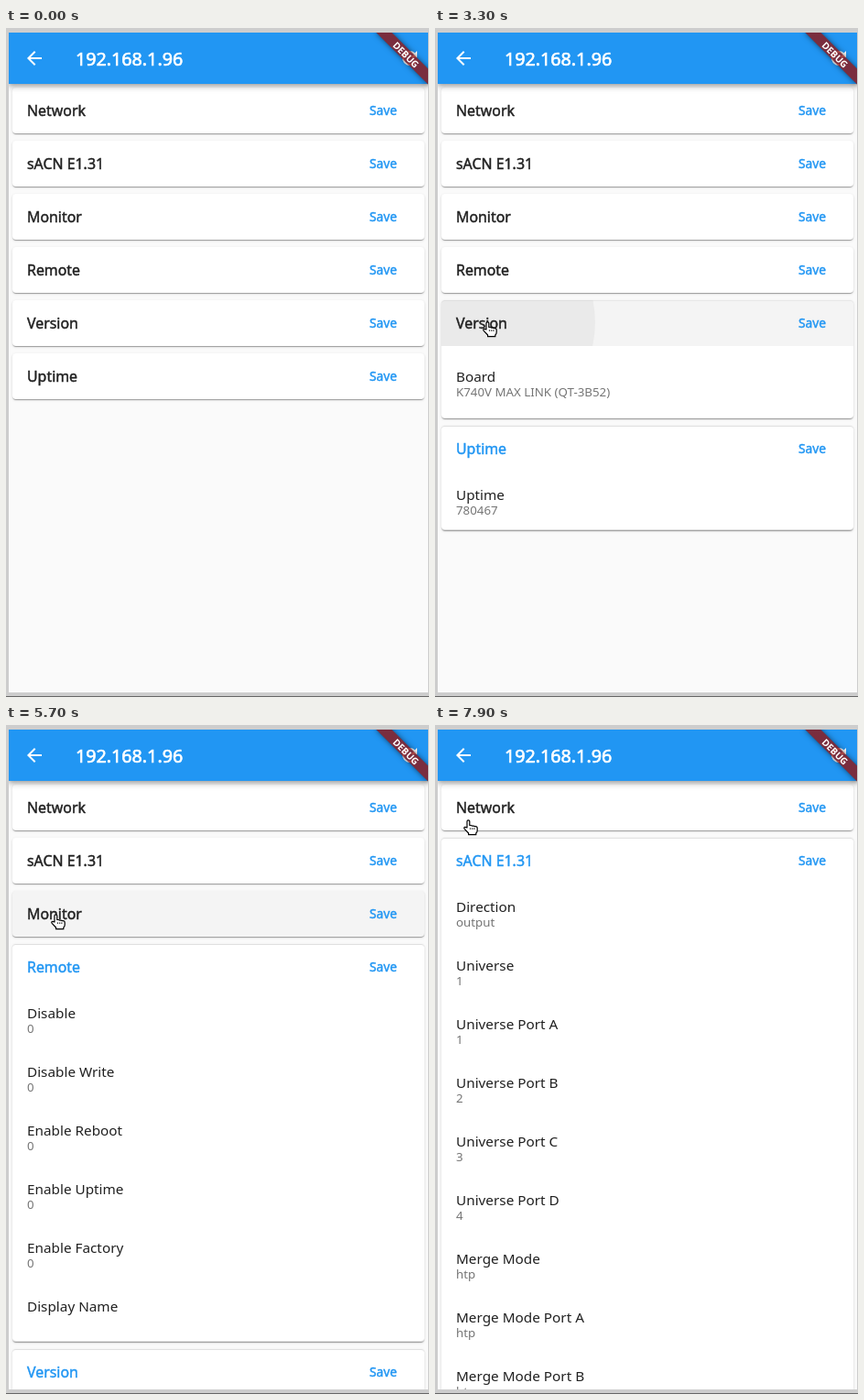
Recreate the animation shown at these times as an HTML page. Size 462 by 730 pixels, loop 8000 ms.

```html
<!DOCTYPE html>
<html lang="en">
<head>
<meta charset="utf-8">
<style>
  html, body { margin: 0; width: 100%; height: 100%; overflow: hidden; background: #cdcdcd; }
  body { position: relative; font-family: "Noto Sans", "Open Sans", sans-serif; color: #212121; }
  body * { position: absolute; left: 0; top: 0; box-sizing: border-box; }
  .floor { top: 729px; width: 462px; height: 1px; background: #666; }
  .app { left: 3px; top: 5px; width: 458px; height: 720px; overflow: hidden; background: #fafafa; }
  .bar { width: 458px; height: 56px; background: #2196f3; color: #fff;
    box-shadow: 0 2px 4px -1px #0003, 0 4px 5px #0002, 0 1px 10px #0002; }
  .title { left: 73px; font-size: 19.7px; line-height: 57px; -webkit-text-stroke: .7px; }
  .bar svg { top: 16px; width: 24px; height: 24px; fill: #fff; }
  .ribbon { left: 458px; width: 80px; height: 12px; transform-origin: 0 0;
    transform: rotate(45deg) translate(-40px, 28px); text-align: center; color: #fff;
    font-size: 10.2px; font-weight: 900; line-height: 12px; box-shadow: 0 0 6px #0008;
    background: linear-gradient(rgba(183, 28, 28, .63) 0 0), rgba(0, 0, 0, .5); }
  .card { left: 4px; width: 450px; background: #fff; border-radius: 4px;
    box-shadow: 0 2px 1px -1px #0003, 0 1px 1px #0002, 0 1px 3px #0002; }
  .head { width: 450px; height: 50px; overflow: hidden; border-radius: 4px 4px 0 0; }
  .name, .save { left: 16px; line-height: 50px; font-size: 15.9px; white-space: pre;
    -webkit-text-stroke: .45px; }
  .save { left: 390px; font-size: 13.8px; color: #2196f3; }
  .splash { border-radius: 50%; background: rgba(0, 0, 0, .04); }
  .body { top: 50px; width: 450px; overflow: hidden; }
  .row { left: 16px; height: 64px; white-space: pre; }
  .row span { top: 15px; font-size: 15.3px; line-height: 20px; }
  .row small { top: 32px; font-size: 13.3px; line-height: 20px; color: #757575; }
  .edge { inset: 0; border: solid #0000001f; border-width: 1px 0; border-radius: 4px; }
  .hand { width: 18px; height: 19px; overflow: visible;
    fill: #fff; stroke: #000; stroke-width: 1.2; stroke-linejoin: round; }
</style>
</head>
<body>
<div class="floor"></div>
<div class="app">
  <div class="list"></div>
  <div class="bar">
    <svg style="left:16px" viewBox="0 0 24 24"><path d="M20 11H7.83l5.59-5.59L12 4l-8 8 8 8 1.41-1.41L7.83 13H20z"/></svg>
    <div class="title">192.168.1.96</div>
    <svg style="left:426px" viewBox="0 0 24 24"><path d="M17.65 6.35A8 8 0 1 0 19.73 14h-2.08A6 6 0 1 1 16.22 7.78L13 11h7V4z"/></svg>
  </div>
  <div class="ribbon">DEBUG</div>
</div>
<svg class="hand" viewBox="0 0 18 19">
  <path d="M4 9V2.2a1.4 1.4 0 0 1 2.8 0V6.5h1.4q1 0 1.4.6h1.3q.9 0 1.3.6h1q2 0 2 2V12q0 2-1.4 3v1.7H5.6V15L1.2 10.4q-.9-1.2 0-1.9.9-.5 1.7.2z"/>
  <path d="M7.5 9.5v1.2m2.2-1.2v1.2m2.2-1.2v1.2"/>
</svg>
<script>
const LOOP = 8000, STEP = 100, OPENING = 200, HEAD = 50, ROW = 64, GAP = 8;

// Each card: title, moment it is tapped, rows as "label|value".
const cards = [
  ['Network', Infinity, []],
  ['sACN E1.31', 6934, ['Direction|output', 'Universe|1',
    ...['A', 'B', 'C', 'D'].map((p, i) => `Universe Port ${p}|${i + 1}`),
    ...['', ' Port A', ' Port B', ' Port C', ' Port D'].map(p => `Merge Mode${p}|htp`),
    'Network Data Loss Timeout|0', 'Disable Merge Timeout|0', 'Enable No Change Update|0']],
  ['Monitor', 5830, ['Format|hex', 'DMX Start Address|1', 'DMX Max Channels|512']],
  ['Remote', 4560, ['Disable|0', 'Disable Write|0', 'Enable Reboot|0', 'Enable Uptime|0',
    'Enable Factory|0', 'Display Name|']],
  ['Version', 3182, ['Version|1.7', 'Board|K740V MAX LINK (QT-3B52)',
    'Build|{date: Sep  8 2021, time: 21:36:02}']],
  ['Uptime', 1950, ['Uptime|780467']],
].map(([title, tap, rows]) => ({ title, tap, rows }));

// Pointer path: time, x, y.
const path = [
  [900, -12, 440], [1600, 64, 399], [2500, 64, 399], [2700, 60, 377], [2900, 59, 328],
  [3900, 59, 328], [4300, 56, 264], [4850, 56, 264], [5400, 56, 214],
  [6100, 56, 214], [6650, 45, 149], [7650, 45, 149], [7900, 38, 111],
];

const clamp = v => Math.max(0, Math.min(1, v));
const mix = (a, b, k) => a + (b - a) * k;

function add(parent, cls, text = '', tag = 'div') {
  const el = document.createElement(tag);
  el.className = cls;
  el.textContent = text;
  return parent.appendChild(el);
}

function pointerAt(t) {
  const i = path.findIndex(p => p[0] > t);
  if (i === 0) return path[0].slice(1);
  if (i < 0) return path[path.length - 1].slice(1);
  const a = path[i - 1], b = path[i], k = (t - a[0]) / (b[0] - a[0]);
  return [mix(a[1], b[1], k), mix(a[2], b[2], k)];
}

// Pointer tip in app coordinates.
function tipAt(t) {
  const [x, y] = pointerAt(t);
  return [x - 5, y - 12];
}

const list = document.querySelector('.list');
const hand = document.querySelector('.hand');

for (const c of cards) {
  c.el = add(list, 'card');
  c.head = add(c.el, 'head');
  c.splash = add(c.head, 'splash');
  c.name = add(c.head, 'name', c.title);
  add(c.head, 'save', 'Save');
  c.body = add(c.el, 'body');
  c.inner = add(c.body, 'inner');
  c.edge = add(c.el, 'edge');
  c.rows.forEach((r, i) => {
    const [label, value] = r.split('|'), row = add(c.inner, 'row');
    row.style.top = i * ROW + 'px';
    add(row, '', label, 'span');
    add(row, '', value, 'small');
  });
}

function drawSplash(c, age, top) {
  const r = Math.max(0, age), [x, y] = tipAt(c.tap);
  Object.assign(c.splash.style, {
    left: x - 4 - r + 'px', top: y - top - r + 'px',
    width: 2 * r + 'px', height: 2 * r + 'px',
    opacity: age > 0 ? clamp((350 - age) / 200) : 0,
  });
}

function draw(t) {
  const [hx, hy] = tipAt(t - STEP);
  let top = 60;
  for (const c of cards) {
    const age = t - c.tap, open = clamp(age / OPENING) ** 1.68;
    const full = c.rows.length * ROW, shown = full * open;
    const hover = hx > 4 && hy >= top && hy < top + HEAD;
    const tint = clamp((age - 130) / 200);
    c.el.style.top = top + 'px';
    c.el.style.height = HEAD + shown + 'px';
    c.body.style.height = shown + 'px';
    c.inner.style.top = (shown - full) / 2 + 'px';
    c.edge.style.opacity = open;
    c.head.style.background = hover ? 'rgba(0,0,0,.045)' : 'none';
    c.name.style.color = `rgb(33,${mix(33, 150, tint)},${mix(33, 243, tint)})`;
    drawSplash(c, age, top);
    top += HEAD + shown + GAP;
  }
  const [x, y] = pointerAt(t);
  hand.style.transform = `translate(${x - 7}px,${y - 8}px)`;
}

// The screen updates ten times a second.
function tick() {
  draw(Math.floor((performance.now() + 15) / STEP) * STEP % LOOP);
  requestAnimationFrame(tick);
}
tick();
</script>
</body>
</html>
```
